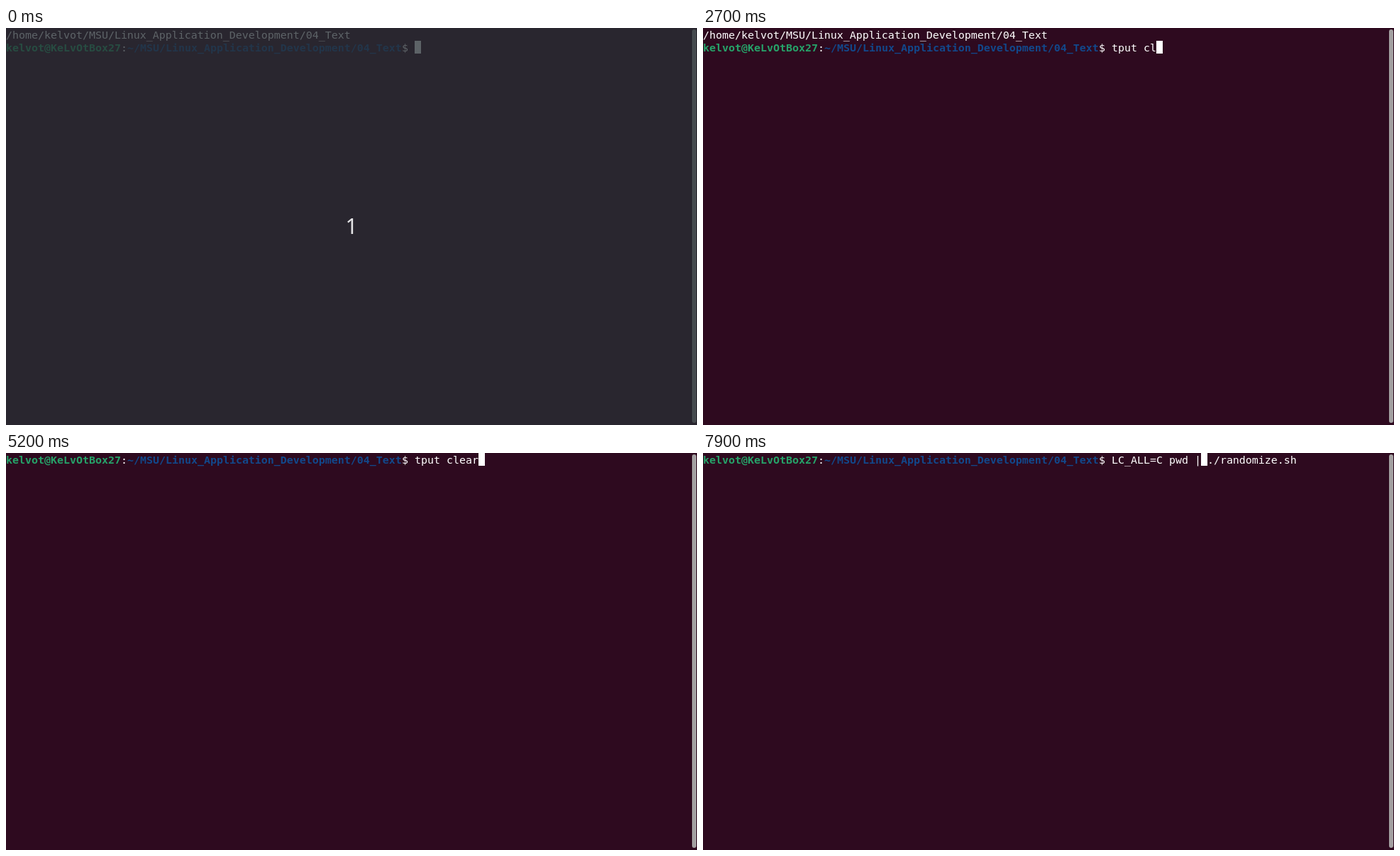
Animation, 974 px wide and 559 px high, one loop 8000 ms. Source, as an HTML page:

```html
<!DOCTYPE html>
<html lang="en">
<head>
<meta charset="utf-8">
<title>Terminal session</title>
<style>
  html, body { margin: 0; width: 100%; height: 100%; overflow: hidden; background: #2e0a1f; }
  svg { display: block; width: 974px; height: 559px; }
  text { font: 14.95px "DejaVu Sans Mono", monospace; fill: #fff; white-space: pre; }
  .user { fill: #26a269; font-weight: bold; }
  .path { fill: #12488b; font-weight: bold; }
  #under { fill: #2e0a1f; }
  #count { font: 30px "Noto Sans", sans-serif; fill: #e4e4e6; text-anchor: middle; }
</style>
</head>
<body>
<svg viewBox="0 0 974 559">
  <rect width="974" height="559" fill="#2e0a1f"/>
  <rect x="967" y="2" width="6" height="554" rx="3" fill="#a3a0a1"/>
  <text id="output" x="0" y="15">/home/kelvot/MSU/Linux_Application_Development/04_Text</text>
  <g id="line">
    <g id="prompt">
      <text class="user" x="0" y="15">kelvot@KeLvOtBox27</text>
      <text x="162" y="15">:</text>
      <text class="path" x="171" y="15">~/MSU/Linux_Application_Development/04_Text</text>
      <text x="558" y="15">$</text>
    </g>
    <text id="command" x="576" y="15"></text>
    <rect id="cursor" width="9" height="18" fill="#fff"/>
    <text id="under" y="15"></text>
  </g>
  <g id="veil">
    <rect width="974" height="559" fill="#272f34" fill-opacity=".75"/>
    <text id="count" x="487" y="290">1</text>
  </g>
</svg>
<script>
  const LOOP = 8000, CELL = 9, ROW = 18, INPUT_X = 576;
  const CLEAR = "tput clear";
  const PIPE = "LC_ALL=C pwd | ./randomize.sh";
  const CLEARED_AT = 4000, PROMPT_AT = 4100;

  const el = id => document.getElementById(id);
  const show = (id, on) => el(id).setAttribute("visibility", on ? "visible" : "hidden");

  // Each step: time, command text, cursor column (null while blinked off).
  const steps = [[0, "", 0], [100, "", null]];
  [400, 800, 1100, 1700, 1900, 2100, 2700, 2900, 3000].forEach((at, i) =>
    steps.push([at, CLEAR.slice(0, i + 1), i + 1]));
  steps.push(
    [3600, CLEAR.slice(0, 9), null],
    [3900, CLEAR, 10],
    [CLEARED_AT, "", 0],
    [4700, "", null],
    [5100, "", 0],
    [5200, CLEAR, 10],
    [5400, PIPE, 29],
    [5900, PIPE, null],
    [6500, PIPE, 29],
    [7000, PIPE, 28]
  );
  // Held left arrow: three cells every 100 ms.
  for (let i = 0; i < 5; i++) steps.push([7500 + i * 100, PIPE, 26 - i * 3]);

  let last = "";

  function draw(t) {
    const [, command, column] = steps.findLast(step => step[0] <= t);
    const prompt = t < CLEARED_AT || t >= PROMPT_AT;
    const key = [command, column, prompt, t < 100, t < CLEARED_AT].join();
    if (key === last) return;
    last = key;

    show("veil", t < 100);
    show("output", t < CLEARED_AT);
    show("prompt", prompt);
    el("line").setAttribute("transform", `translate(0 ${t < CLEARED_AT ? ROW : 0})`);
    el("command").textContent = command;

    const x = (prompt ? INPUT_X : 0) + (column ?? 0) * CELL;
    show("cursor", column !== null);
    el("cursor").setAttribute("x", x);
    el("under").setAttribute("x", x);
    el("under").textContent = column === null ? "" : command.charAt(column);
  }

  const start = performance.now();
  function tick() {
    draw((performance.now() - start) % LOOP);
    requestAnimationFrame(tick);
  }
  tick();
</script>
</body>
</html>
```
